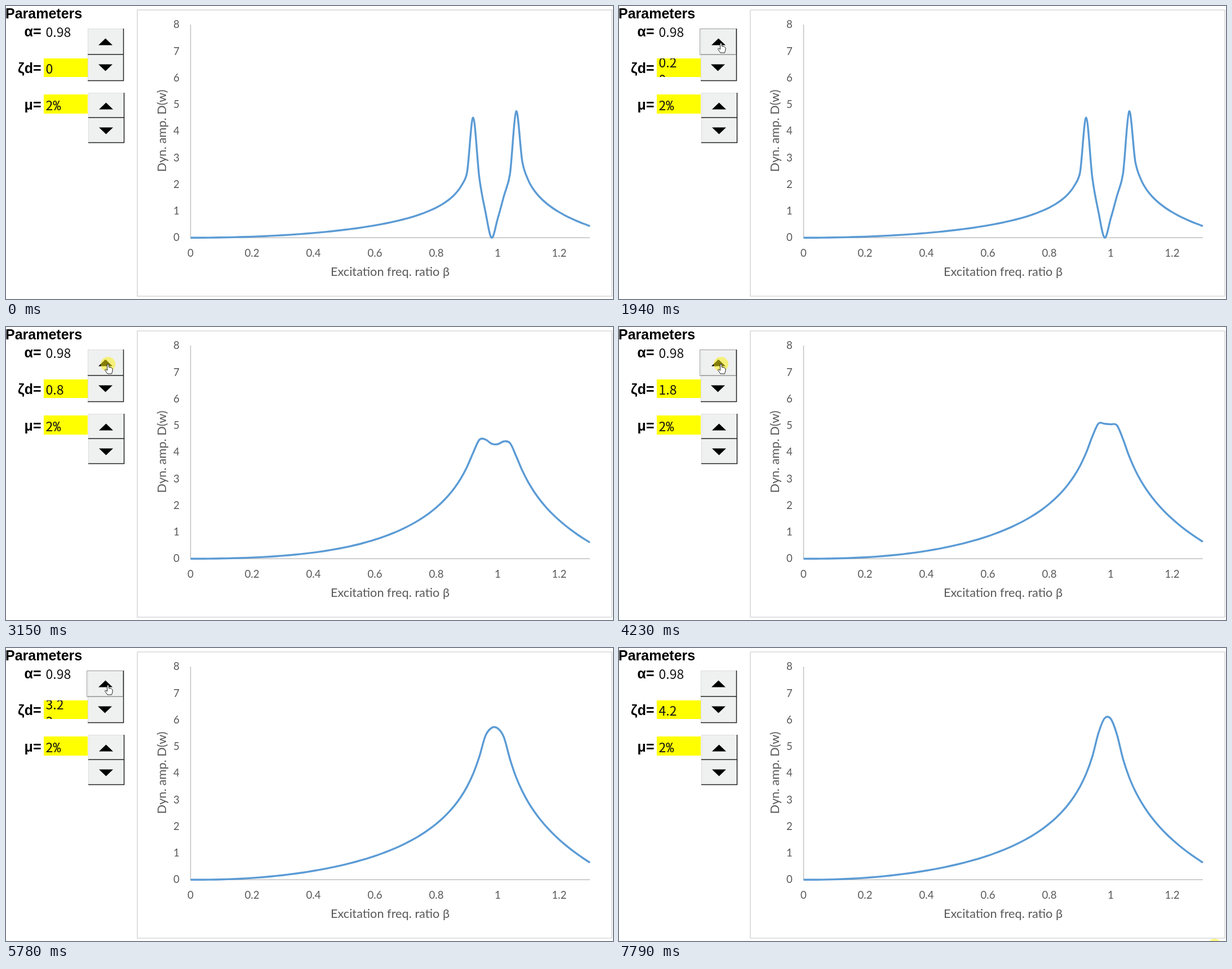
These frames come from a looping animation (1077 px wide and 520 px high, 7.86 s). An HTML page with a canvas:

```html
<!DOCTYPE html>
<html lang="en">
<head>
<meta charset="utf-8">
<title>Tuned mass damper response</title>
<style>
  html, body { margin: 0; width: 100%; height: 100%; overflow: hidden; background: #fff; }
  canvas { display: block; }
</style>
</head>
<body>
<canvas id="stage" width="1077" height="520"></canvas>
<script>
const ctx = document.getElementById('stage').getContext('2d');
const LOOP = 7860, ALPHA = 0.98, MU = 0.02, STEP = 0.2, SAMPLES = 66;
const CHART_FONT = 'Lato, sans-serif';
const BOLD = 'bold 25px "Liberation Sans", Arial, sans-serif';
const VALUE_FONT = '300 23px "Noto Sans CJK SC", "Noto Sans CJK JP", "Noto Sans", sans-serif';

// Moments at which the damping value steps up
const clicks = [1935, 2280, 2600, 2910, 3300, 3540, 3770, 3990, 4190, 4450, 4710,
  4985, 5180, 5375, 5570, 5765, 5960, 6155, 6350, 6600, 6800];

// Pointer path: time, x, y
const path = [[300, 998, 533], [1080, 241, 124], [1580, 181, 66], [6900, 181, 66],
  [7450, 1064, 500], [7560, 1057, 529]];

const clamp = u => Math.max(0, Math.min(1, u));
const smooth = u => { u = clamp(u); return u * u * (3 - 2 * u); };

// Logarithmic dynamic amplification of the main mass
function amplification(beta, zeta) {
  const b2 = beta * beta, a2 = ALPHA * ALPHA, damp = 2 * zeta * ALPHA * beta;
  const rigid = 1 - (1 + MU) * b2;
  const re = (a2 - b2) * (1 - b2) - MU * a2 * b2;
  const ratio = Math.hypot(a2 - b2, damp) / Math.hypot(re, damp * rigid * rigid);
  return Math.max(0, Math.log(ratio));
}

const curves = Array.from({ length: clicks.length + 1 }, (_, k) =>
  Array.from({ length: SAMPLES }, (_, i) => amplification(i / 50, k * STEP)));

// The chart eases towards each new curve
function curveAt(t) {
  return curves[0].map((start, i) => clicks.reduce((y, at, k) =>
    y + (curves[k + 1][i] - curves[k][i]) * smooth((t - at) / 400), start));
}

function line(x1, y1, x2, y2, color, width = 1) {
  ctx.strokeStyle = color;
  ctx.lineWidth = width;
  ctx.beginPath();
  ctx.moveTo(x1, y1);
  ctx.lineTo(x2, y2);
  ctx.stroke();
}

function text(str, x, y, font, color = '#000', align = 'left') {
  ctx.font = font;
  ctx.fillStyle = color;
  ctx.textAlign = align;
  ctx.fillText(str, x, y);
}

function polygon(points) {
  ctx.beginPath();
  points.forEach(([x, y]) => ctx.lineTo(x, y));
  ctx.closePath();
}

function triangle(x, y, dir) {
  polygon([[x - 12.5, y + 6 * dir], [x + 12.5, y + 6 * dir], [x, y - 6 * dir]]);
  ctx.fillStyle = '#000';
  ctx.fill();
}

function spinner(x, y, w, h, half, pressed) {
  ctx.fillStyle = '#eff0f0';
  ctx.fillRect(x, y, w, h);
  line(x + .5, y, x + .5, y + h, '#dcdcdc');
  line(x, y + .5, x + w, y + .5, '#dcdcdc');
  line(x, y + half, x + w, y + half, pressed ? '#aaa' : '#222', 1.3);
  line(x + w - .5, y, x + w - .5, y + h, '#222', 1.5);
  line(x, y + h - .5, x + w, y + h - .5, '#222', 1.5);
  const shift = pressed ? 1 : 0;
  if (pressed) {
    ctx.strokeStyle = '#999';
    ctx.lineWidth = 1;
    ctx.strokeRect(x - 1.5, y + .5, w, half);
  }
  triangle(x + 31.5, y + 23.5, 1);
  triangle(x + 31.5 - shift, y + half + 23.5, -1);
}

function drawChart(t) {
  const px = b => 327.5 + b * 545, py = d => 411.3 - d * 47.25;
  ctx.strokeStyle = '#d9d9d9';
  ctx.lineWidth = 1.6;
  ctx.strokeRect(233, 7, 842, 508);
  line(327.5, 33, 327.5, 411, '#bfbfbf', 1.5);
  line(327, 411.3, 1036, 411.3, '#bfbfbf', 1.5);

  const grey = '#595959', tick = '18.6px ' + CHART_FONT, title = '21.7px ' + CHART_FONT;
  for (let d = 0; d <= 8; d++) text(d, 302.5, py(d) + 6, tick, grey, 'center');
  for (let i = 0; i <= 6; i++) text(+(i * .2).toFixed(1), px(i * .2), 444.5, tick, grey, 'center');
  text('Excitation freq. ratio β', 681.5, 479, title, grey, 'center');
  ctx.save();
  ctx.translate(284, 221.5);
  ctx.rotate(-Math.PI / 2);
  text('Dyn. amp. D(w)', 0, 0, title, grey, 'center');
  ctx.restore();

  const pts = curveAt(t).map((d, i) => [px(i / 50), py(d)]);
  const at = i => pts[Math.max(0, Math.min(SAMPLES - 1, i))];
  ctx.beginPath();
  ctx.moveTo(...pts[0]);
  for (let i = 0; i < SAMPLES - 1; i++) {
    const [a, b, c, d] = [at(i - 1), at(i), at(i + 1), at(i + 2)];
    const seg = Math.hypot(c[0] - b[0], c[1] - b[1]) / 2;
    const handle = (from, to) => {
      const dx = to[0] - from[0], dy = to[1] - from[1];
      const k = Math.min(1 / 6, seg / Math.hypot(dx, dy));
      return [dx * k, dy * k];
    };
    const h1 = handle(a, c), h2 = handle(b, d);
    ctx.bezierCurveTo(b[0] + h1[0], b[1] + h1[1], c[0] - h2[0], c[1] - h2[1], c[0], c[1]);
  }
  ctx.strokeStyle = '#5b9bd5';
  ctx.lineWidth = 3.4;
  ctx.lineJoin = 'round';
  ctx.stroke();
}

function drawPanel(t) {
  const count = clicks.filter(at => at <= t).length;
  const format = k => String(+(k * STEP).toFixed(1));
  const pressed = clicks.some(at => t >= at - 40 && t < at + 60);
  const scrolling = count > 0 && t - clicks[count - 1] < 25;

  text('Parameters', -1, 22, BOLD);
  text('α=', 62.5, 54, BOLD, '#000', 'right');
  text('ζd=', 62.5, 119, BOLD, '#000', 'right');
  text('μ=', 62.5, 184, BOLD, '#000', 'right');
  text('0.98', 70.5, 55, VALUE_FONT, '#111');

  ctx.fillStyle = '#ff0';
  ctx.fillRect(67, 93, 78, 33);
  ctx.fillRect(67, 157, 78, 34);
  ctx.save();
  ctx.beginPath();
  ctx.rect(67, 93, 78, 33);
  ctx.clip();
  if (scrolling) {
    text(format(count), 70.5, 109, VALUE_FONT, '#111');
    text(format(count - 1), 70.5, 139, VALUE_FONT, '#111');
  } else {
    text(format(count), 70.5, 119.5, VALUE_FONT, '#111');
  }
  ctx.restore();
  text('2', 70.5, 185, VALUE_FONT, '#111');
  text('%', 83.5, 185, '300 23px "Noto Sans Mono", monospace', '#111');

  spinner(145, 40, 64, 93, 46, pressed);
  spinner(146, 154, 64, 89, 44, false);
}

function drawPointer(t) {
  if (t < path[0][0]) return;
  let i = 0;
  while (i < path.length - 2 && t >= path[i + 1][0]) i++;
  const [t0, x0, y0] = path[i], [t1, x1, y1] = path[i + 1];
  const u = smooth((t - t0) / (t1 - t0));
  const x = x0 + (x1 - x0) * u, y = y0 + (y1 - y0) * u;

  if (!clicks.some(at => t >= at - 60 && t < at + 30)) {
    ctx.fillStyle = 'rgba(252, 240, 10, .52)';
    ctx.beginPath();
    ctx.arc(x, y, 13, 0, 7);
    ctx.fill();
  }

  ctx.save();
  ctx.translate(x, y);
  if (x < 210) {
    polygon([[-1.5, 0], [1, 0], [1.5, 5.5], [4, 5.5], [6.5, 6.5], [8, 8], [8, 12],
      [6.5, 17], [-1, 17], [-5.5, 10.5], [-4.5, 9], [-1.5, 11]]);
  } else {
    polygon([[0, 0], [0, 16], [4, 12.5], [6.5, 18], [9, 17], [6.5, 11.5], [11.5, 11.5]]);
  }
  ctx.fillStyle = '#fff';
  ctx.fill();
  ctx.strokeStyle = '#222';
  ctx.lineWidth = 1;
  ctx.stroke();
  ctx.restore();
}

function frame(now) {
  const t = now % LOOP;
  ctx.fillStyle = '#fff';
  ctx.fillRect(0, 0, 1077, 520);
  drawChart(t);
  drawPanel(t);
  drawPointer(t);
  requestAnimationFrame(frame);
}
requestAnimationFrame(frame);
</script>
</body>
</html>
```
